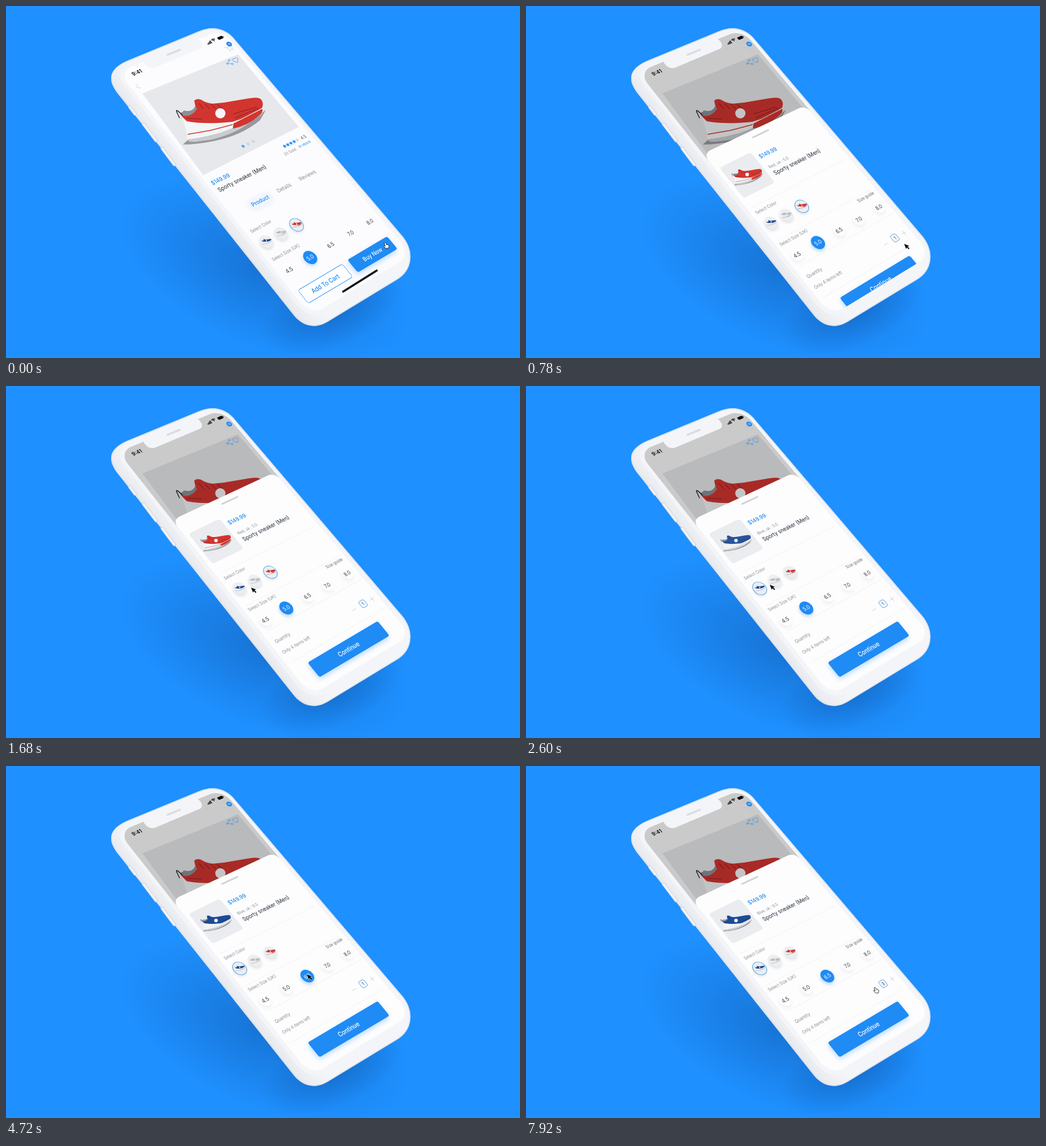
Recreate the animation shown at these times as an HTML page with a canvas. Size 904 px wide and 620 px high, loop 8000 ms.

```html
<!DOCTYPE html>
<html lang="en">
<head>
<meta charset="utf-8">
<title>Shop checkout on a tilted phone</title>
<style>
html, body { margin: 0; width: 100%; height: 100%; overflow: hidden; background: #1e90ff; }
canvas { display: block; }
</style>
</head>
<body>
<canvas id="stage" width="904" height="620"></canvas>
<script>
const ctx = document.getElementById('stage').getContext('2d');
const LOOP = 8000, W = 375, H = 812;
const BLUE = '#1f8bf5', INK = '#1f2935', GREY = '#8b8f96', FACE = '#f3f5f9';

// Perspective from the phone's 375 x 812 screen plane to the stage.
const A = 204.3 / W, B = 293.1 / H, C = 197.5;
const D = -72.9 / W, E = 383.5 / H, F = 116.3;
const G = 0.0593 / W, K = -0.0847 / H;
let shift = 0; // how far the current layer is pushed down the plane

function project(u, v) {
  const w = 1 + G * u + K * v;
  return [(A * u + B * v + C) / w, (D * u + E * v + F) / w];
}
function unproject(x, y) {
  const p = A - G * x, q = B - K * x, r = D - G * y, s = E - K * y, k = p * s - q * r;
  return [((x - C) * s - q * (y - F)) / k, (p * (y - F) - r * (x - C)) / k];
}
function shifted(x, y) {
  const [u, v] = unproject(x, y);
  return project(u, v + shift);
}

// Runs draw() with the origin at a stage point and the axes lying in the plane.
function at(x, y, draw) {
  const [X, Y] = shifted(x, y), [u, v] = unproject(X, Y), w = 1 + G * u + K * v;
  ctx.save();
  ctx.transform((A - G * X) / w, (D - G * Y) / w, (B - K * X) / w, (E - K * Y) / w, X, Y);
  draw();
  ctx.restore();
}

// Rounded rectangle in plane units, projected to the stage.
function panel(u0, v0, u1, v1, r) {
  const p = new Path2D(), k = r * 0.42;
  const corner = (u, v, su, sv, flip) => {
    const ends = [[u, v + sv * r], [u, v + sv * k], [u + su * k, v], [u + su * r, v]];
    if (flip) ends.reverse();
    const [a, b, c, d] = ends.map(e => project(...e));
    p.lineTo(...a);
    p.bezierCurveTo(...b, ...c, ...d);
  };
  corner(u0, v0, 1, 1);
  corner(u1, v0, -1, 1, true);
  corner(u1, v1, -1, -1);
  corner(u0, v1, 1, -1, true);
  p.closePath();
  return p;
}

const clamp = x => Math.min(1, Math.max(0, x));
const ramp = (t, a, b) => clamp((t - a) / (b - a));
const smooth = p => p * p * (3 - 2 * p);
const cubic = p => p < 0.5 ? 4 * p ** 3 : 1 - 4 * (1 - p) ** 3;

function fill(path, color, alpha = 1) {
  ctx.globalAlpha = alpha;
  ctx.fillStyle = color;
  ctx.fill(path);
  ctx.globalAlpha = 1;
}
function stroke(path, color, width) {
  ctx.strokeStyle = color;
  ctx.lineWidth = width;
  ctx.stroke(path);
}
function fillSoft(path, color, blur, shade, dy, alpha = 1) {
  ctx.shadowBlur = blur;
  ctx.shadowColor = shade;
  ctx.shadowOffsetY = dy;
  fill(path, color, alpha);
  ctx.shadowColor = 'transparent';
}
function shape(build) { const p = new Path2D(); build(p); return p; }
const disc = r => shape(p => p.arc(0, 0, r, 0, 7));
const box = (w, h, r) => shape(p => p.roundRect(-w / 2, -h / 2, w, h, r));

function glyphs(str, size, color, weight, alpha = 1) {
  ctx.globalAlpha = alpha;
  ctx.font = `${weight} ${size}px Inter, sans-serif`;
  ctx.fillStyle = color;
  ctx.fillText(str, 0, size * 0.36);
  ctx.globalAlpha = 1;
}
function text(str, x, y, size, color = GREY, weight = 400) {
  at(x, y, () => glyphs(str, size, color, weight));
}

// Shoe, drawn around its own centre.
const SHOE = {
  shadow: new Path2D('M311 244L322 234L445 192L457 183L447 201Q415 228 365 238Q335 244 311 244Z'),
  upper: new Path2D('M306 189L312 186Q328 192 334 181L331 167Q335 162 343 165Q352 171 364 172L384 170L425 163Q445 159 449 165Q454 172 450 180L400 206L352 208L328 212L316 205Z'),
  collar: new Path2D('M308 189L313 184Q328 188 333 176L336 181Q327 196 312 193Z'),
  sole: new Path2D('M307 192L318 203Q350 209 398 204Q428 196 451 179Q454 186 449 191L420 211Q400 225 362 235L332 239Q320 240 318 232Q319 218 307 192Z'),
  shade: new Path2D('M319 235Q345 232 374 224Q405 214 449 191L420 211Q400 225 362 235L332 239Q320 240 319 235Z'),
  wedge: new Path2D('M400 207L451 181Q453 188 444 194Q425 211 399 216Z'),
  line: new Path2D('M320 226L360 219L398 209'),
  laces: new Path2D('M340 172L347 181M350 173L358 181M361 174L369 181M372 174L381 181M318 198L344 199M400 190L440 178M404 197L444 180'),
  loop: new Path2D('M310 192Q298 180 300 186L305 197')
};
const RED = ['#d2352f', '#d2352f'], NAVY = ['#1c4c98', '#e3e6ea'], SILVER = ['#c0c2c6', '#d5d6d9'];

function shoe(x, y, scale, [upper, wedge], alpha = 1) {
  ctx.save();
  ctx.translate(x, y);
  ctx.scale(scale, scale);
  ctx.translate(-376, -203);
  fill(SHOE.shadow, '#85868a', alpha * 0.8);
  fill(SHOE.upper, upper, alpha);
  fill(SHOE.collar, '#8b9097', alpha);
  fill(SHOE.sole, '#f4f5f6', alpha);
  fill(SHOE.shade, '#c9cbcf', alpha);
  fill(SHOE.wedge, wedge, alpha);
  ctx.globalAlpha = alpha;
  stroke(SHOE.line, wedge, 1.5);
  stroke(SHOE.laces, 'rgba(60,10,20,.35)', 1.6);
  stroke(SHOE.loop, '#26282c', 1.5);
  fill(shape(p => p.arc(377, 189, 9, 0, 7)), '#f4f5f6', alpha);
  ctx.restore();
}

function swatches(points, blue) {
  points.forEach(([x, y], i) => {
    at(x, y, () => {
      fillSoft(disc(18), '#eceef0', 5, 'rgba(30,40,60,.14)', 3);
      ctx.globalAlpha = [blue, 0, 1 - blue][i];
      stroke(disc(19), '#4a9fec', 1.5);
      ctx.globalAlpha = 1;
    });
    shoe(...shifted(x, y), 0.115, [NAVY, SILVER, RED][i]);
  });
}

function sizes(points, mix, raised) {
  ['4.5', '5.0', '6.5', '7.0', '8.0'].forEach((label, i) => at(...points[i], () => {
    const on = [0, 1 - mix, mix, 0, 0][i];
    if (raised) fillSoft(disc(17), '#fdfdfe', 6, 'rgba(30,40,60,.06)', 4);
    glyphs(label, 15, '#3a3f47', 400);
    if (!on) return;
    fillSoft(disc(19), BLUE, 6, 'rgba(31,139,245,.3)', 3, on);
    glyphs(label, 15, '#fff', 400, on);
  }));
}

function button(label, x, y, w, h, size, solid) {
  at(x, y, () => {
    const b = box(w, h, 6);
    if (solid) fillSoft(b, BLUE, 8, 'rgba(31,139,245,.3)', 4);
    else { fill(b, '#fff'); stroke(b, BLUE, 1.3); }
    glyphs(label, size, solid ? '#fff' : BLUE, 500);
  });
}

function star(r) {
  return shape(p => {
    for (let i = 0; i < 10; i++) {
      const a = i * Math.PI / 5, q = i % 2 ? r * 0.45 : r;
      p.lineTo(q * Math.sin(a), -q * Math.cos(a));
    }
    p.closePath();
  });
}

const OUTER = new Path2D('M198 156C177 130 181 111 212 97L338 45C366 33 389 41 404 61L697 405C719 431 716 467 686 483L566 556C541 571 519 562 504 542Z');
const SCREEN = panel(0, 0, W, H, 44);

function glow(x, y, rx, ry, turn, alpha) {
  ctx.save();
  ctx.translate(x, y);
  ctx.rotate(turn);
  ctx.scale(rx, ry);
  const g = ctx.createRadialGradient(0, 0, 0, 0, 0, 1);
  g.addColorStop(0, `rgba(10,60,130,${alpha})`);
  g.addColorStop(0.5, `rgba(10,60,130,${alpha * 0.5})`);
  g.addColorStop(1, 'rgba(10,60,130,0)');
  fill(disc(1), g);
  ctx.restore();
}

function backdrop() {
  ctx.fillStyle = '#1e90ff';
  ctx.fillRect(0, 0, 904, 620);
  glow(455, 465, 270, 135, 0.4, 0.34);
  glow(575, 535, 135, 65, -0.4, 0.3);
}

function body() {
  const g = ctx.createLinearGradient(345, 350, 385, 318);
  g.addColorStop(0, '#e3e6eb');
  g.addColorStop(0.35, '#eceef2');
  g.addColorStop(1, FACE);
  fill(OUTER, g);
  ctx.save();
  ctx.clip(OUTER);
  stroke(OUTER, '#d9dfe8', 3);
  ctx.restore();
  ctx.lineCap = 'round';
  const keys = new Path2D('M218 178L227 190M242 208L264 237M275 251L296 279');
  stroke(keys, '#cfd5de', 6);
  stroke(keys, '#eff1f4', 4);
  fill(panel(-12, -12, W + 10, H + 13, 56), FACE);
}

function home() {
  fill(SCREEN, '#fcfcfe');
  fill(new Path2D('M240 154L408 85L515 213L347 298Z'), '#e7e8eb');
  shoe(376, 203, 1, RED);
  [[417, 247], [426, 243], [435, 238.5]].forEach(([x, y], i) =>
    at(x, y, () => fill(disc(4.5), i ? '#ccd3dc' : '#55a5f0')));

  for (let i = 0; i < 5; i++)
    at(490 + i * 5.6, 247 - i * 2.7, () => fill(star(6.5), i < 4 ? BLUE : '#d3d6da'));
  text('4.5', 523, 231, 13, '#555a61');
  text('20 Sold .', 501, 256, 12);
  text('In stock', 525, 243, 12, BLUE);
  text('$149.99', 377, 305, 16, BLUE, 500);
  text('Sporty sneaker (Men)', 415, 303.5, 16.5, INK);

  at(447, 343, () => fillSoft(box(76, 30, 12), '#f1f6fd', 8, 'rgba(31,139,245,.1)', 2));
  text('Product', 447, 343, 16, BLUE, 500);
  text('Details', 489, 320, 15.5);
  text('Reviews', 530, 298, 15.5);

  text('Select Color', 448, 388, 12.5);
  swatches([[458, 415], [484, 400.5], [511, 385.5]], 0);
  text('Select Size (UK)', 492, 434, 12.5);
  sizes([[498, 465], [535, 443], [571, 421], [606, 400], [640, 380]], 0, false);
  button('Add To Cart', 561.5, 489, 160, 41, 17, false);
  button('Buy Now', 644.5, 437.5, 152, 41, 16.5, true);
  ctx.lineCap = 'round';
  stroke(new Path2D('M593 503L652 466'), '#0b0c0e', 3.6);
}

function topIcons() {
  text('9:41', 230, 117, 16, '#0b0c0e', 600);
  at(357, 64, () => {
    ctx.fillStyle = '#0b0c0e';
    for (let i = 0; i < 4; i++) ctx.fillRect(-8 + i * 4.2, 2 - i * 2, 3, 4 + i * 2);
  });
  at(365, 60, () => {
    ctx.lineCap = 'butt';
    for (const r of [2, 5.5, 9])
      stroke(shape(p => p.arc(0, 5, r, -2.35, -0.8)), '#0b0c0e', 2.2);
  });
  at(377, 56, () => {
    fill(box(19, 9, 2.5), '#0b0c0e');
    ctx.fillRect(11, -2, 1.6, 4);
  });

  ctx.lineCap = ctx.lineJoin = 'round';
  at(232, 142, () => stroke(new Path2D('M4 -7L-4 0L4 7'), '#c0c4ca', 1.1));
  at(393, 74, () => {
    stroke(new Path2D('M-13 -7H-9L-5 5H8L11 -5H-8'), '#bcc0c6', 1.1);
    fill(shape(p => { p.arc(-4, 9, 1.6, 0, 7); p.arc(7, 9, 1.6, 0, 7); }), '#bcc0c6');
  });
  at(392.5, 67, () => { fill(disc(8.5), BLUE); glyphs('10', 8, '#fff', 500); });
  at(392.5, 100, () => {
    stroke(new Path2D('M4 -6L-6 0L4 6'), BLUE, 1);
    for (const [x, y] of [[6, -7], [-7, 0], [6, 7]])
      stroke(shape(p => p.arc(x, y, 2.8, 0, 7)), BLUE, 1.1);
  });
  at(404, 95.5, () =>
    stroke(new Path2D('M0 8C-16 -2 -8 -12 0 -5C8 -12 16 -2 0 8Z'), BLUE, 1.1));
}

function sheet(blue, sizeMix, count) {
  fill(panel(0, 241 + shift, W, H + 60 + shift, 26), '#fdfdfe');
  ctx.lineCap = 'round';
  at(393.5, 201.5, () => stroke(new Path2D('M-28 0H28'), '#d2d4d8', 5));
  for (const [x, y] of [[460, 288], [505, 343], [543, 386], [582, 440]])
    at(x, y, () => stroke(new Path2D('M-172 0H172'), '#f2f3f5', 1.5));

  at(369.5, 273.5, () => fill(box(110, 103, 8), '#ebecf0'));
  const [X, Y] = shifted(369, 277);
  shoe(X, Y, 0.35, RED, 1 - blue);
  if (blue) shoe(X, Y, 0.35, NAVY, blue);
  text('$149.99', 406, 234.5, 16, BLUE, 500);
  text(`${blue > 0.5 ? 'Blue' : 'Red'}, uk : ${sizeMix > 0.5 ? '6.5' : '5.0'}`, 424.5, 251.5, 12);
  text('Sporty sneaker (Men)', 457, 250.5, 16.5, INK);

  text('Select Color', 402, 330, 12.5);
  swatches([[411, 356.5], [438, 343], [465, 328]], blue);
  text('Select Size (UK)', 450, 382, 12.5);
  text('Size guide', 577, 312, 12.5, '#6a6f76');
  sizes([[456, 412], [493, 391], [530, 370], [565, 351], [600, 330]], sizeMix, true);

  text('Quantity', 486, 443.5, 13);
  text('Only 4 items left', 510, 456, 12.5);
  ctx.lineCap = 'butt';
  at(612.5, 394, () => stroke(new Path2D('M-7 0H7'), '#c6c9ce', 1.3));
  at(644, 375, () => stroke(new Path2D('M-8 0H8M0 -8V8'), '#c6c9ce', 1.3));
  at(628, 383.5, () => {
    fill(box(20, 20, 5), '#fff');
    stroke(box(20, 20, 5), BLUE, 1.3);
    glyphs(count, 13, INK, 400);
  });
  button('Continue', 602.5, 463.5, 260, 47, 17.5, true);
}

function notch() {
  fill(panel(86, -12, 286, 30, 20), FACE);
  ctx.lineCap = 'round';
  stroke(new Path2D('M284 86L306 77'), '#dadde1', 3.6);
}

const ARROW = new Path2D('M0 0L9 3.6L6 4.8L9.5 8L8 9.5L4.8 6.2L3.5 9Z');
const HAND = new Path2D('M-3.5 -5Q-2 -6.6 -.8 -5L.6 -2L4 -1.4Q5.8 -.6 5.5 1.4L4.6 5.4H-.4L-4.4 1.6Q-4.4 -.2 -2.8 .4L-1.8 1Z');

// Start, end and destination of each pointer move.
const MOVES = [
  [860, 1680, 431, 355], [1700, 2120, 412, 355], [2440, 2980, 490, 332],
  [3120, 3860, 529, 367], [5420, 6180, 646, 375], [7140, 7600, 612, 392]
];

function pointer(t) {
  let x = 665, y = 419;
  for (const [a, b, tx, ty] of MOVES) {
    const p = smooth(ramp(t, a, b));
    x += (tx - x) * p;
    y += (ty - y) * p;
  }
  const pressing = t < 320 || (t >= 6600 && t < 6860) || t >= 7840;
  ctx.save();
  ctx.lineJoin = 'round';
  if (pressing) {
    ctx.translate(x + 3.5, y + 3);
    ctx.scale(0.9, 0.9);
    fill(HAND, '#fff');
    stroke(HAND, '#222', 1);
  } else {
    ctx.translate(x, y);
    stroke(ARROW, '#fff', 0.8);
    fill(ARROW, '#08090b');
  }
  ctx.restore();
}

function frame() {
  const t = performance.now() % LOOP;
  ctx.textAlign = 'center';
  shift = 0;
  backdrop();
  body();
  ctx.save();
  ctx.clip(SCREEN);
  home();
  fill(SCREEN, '#000', 0.2 * smooth(ramp(t, 40, 640)));
  topIcons();
  shift = 580 * (1 - cubic(ramp(t, 40, 1060)));
  if (t > 40) {
    const count = t < 6600 ? '1' : t < 7140 ? '2' : '3';
    sheet(smooth(ramp(t, 2380, 2640)), smooth(ramp(t, 4260, 4560)), count);
  }
  shift = 0;
  ctx.restore();
  notch();
  pointer(t);
  requestAnimationFrame(frame);
}
frame();
</script>
</body>
</html>
```
